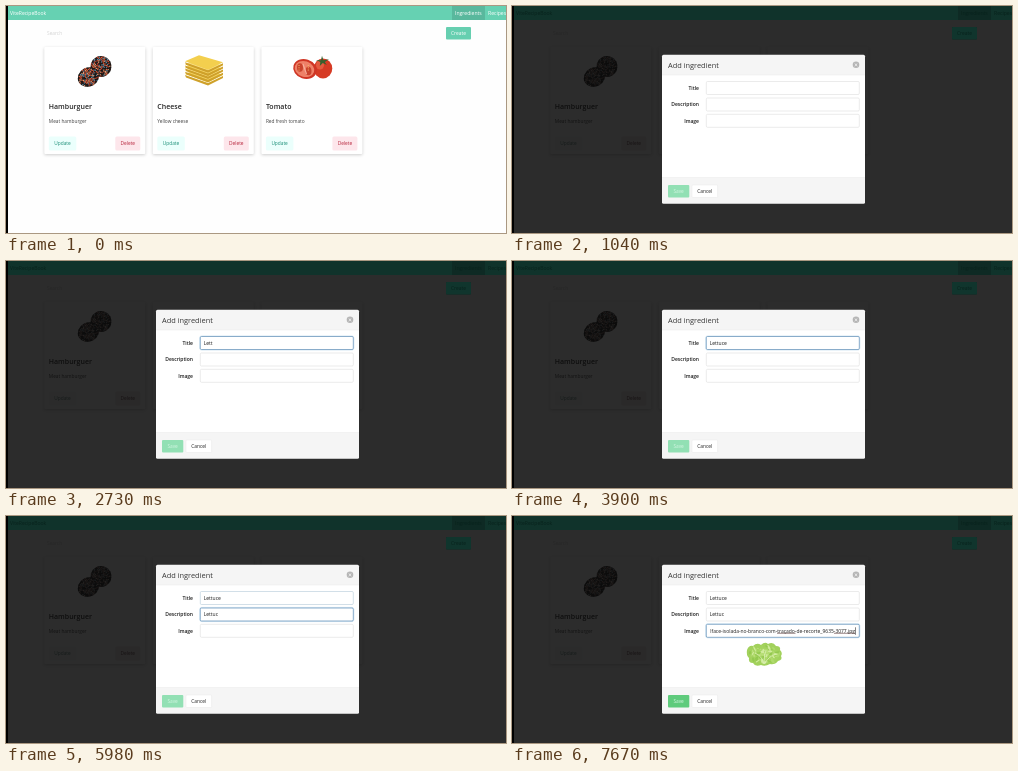
An HTML page that plays this animation: 500 px wide and 227 px high, repeating every 8000 ms.

```html
<!DOCTYPE html>
<html lang="en">
<head>
<meta charset="utf-8">
<title>Recipe book</title>
<style>
html, body { margin: 0; width: 100%; height: 100%; overflow: hidden; background: #fefefe; }
svg { display: block; width: 100%; height: 100%; font: 4.8px "Open Sans", "Noto Sans", sans-serif; }
text { white-space: pre; }
.b { font-weight: 600; }
.card { filter: drop-shadow(0 1px 1.6px rgba(10,10,10,.2)); }
.dim { filter: saturate(.25); }
</style>
</head>
<body>
<svg id="stage" viewBox="0 0 500 227"></svg>
<script>
const LOOP = 8000;
const svg = document.getElementById('stage');

const rect = (x, y, w, h, fill, more = '') =>
  `<rect x="${x}" y="${y}" width="${w}" height="${h}" fill="${fill}" ${more}/>`;
const text = (x, y, s, fill, more = '') =>
  `<text x="${x}" y="${y}" fill="${fill}" ${more}>${s}</text>`;
const oval = (x, y, rx, ry, fill, more = '') =>
  `<ellipse cx="${x}" cy="${y}" rx="${rx}" ry="${ry}" fill="${fill}" ${more}/>`;
const path = (d, fill, more = '') => `<path d="${d}" fill="${fill}" ${more}/>`;
const many = (n, f) => Array.from({ length: n }, (_, i) => f(i)).join('');

function random(seed) {
  return () => (seed = (seed * 16807) % 2147483647) / 2147483647;
}

function patty(cx, cy, rx, ry, seed) {
  const r = random(seed);
  const colors = ['#e2603c', '#151515', '#5f8fae', '#c8452f', '#222', '#e8a07a'];
  return `<g transform="rotate(-28 ${cx} ${cy})">` + oval(cx, cy, rx, ry, '#2a1d18') +
    many(150, i => {
      const a = i * 2.4, d = Math.sqrt(i / 150) * .95;
      return oval((cx + Math.cos(a) * d * rx).toFixed(1), (cy + Math.sin(a) * d * ry).toFixed(1),
        .75, .65, colors[Math.floor(r() * colors.length)]);
    }) + '</g>';
}

function cheese() {
  const slice = i => {
    const y = 71 - i * 3.2;
    return path(`M179 ${y - 2}L202 ${y + 6}L217 ${y - 1}V${y + 1}L202 ${y + 8.5}L180 ${y + .5}Z`, '#cfa12a') +
      path(`M179 ${y - 3}L193 ${y - 9}L217 ${y - 2}L202 ${y + 5.5}Z`, i % 2 ? '#f8e08a' : '#f3cf4e');
  };
  return many(5, slice);
}

function tomato() {
  return oval(317, 62.5, 9.3, 10, '#d63a24') + oval(314, 59, 4, 4.5, '#ea6a4c', 'opacity=".7"') +
    path('M310 54l5 .3 1-4.5 1.4 4.4 5.6-1-4.2 2.8 2 3-4-2-3 3 .5-4Z', '#39602e') +
    oval(299, 63, 12, 9.7, '#cf3524', 'transform="rotate(18 299 63)"') +
    oval(298.5, 63, 10, 7.8, '#ee8168', 'transform="rotate(18 298.5 63)"') +
    oval(294, 61.5, 3, 4.3, '#c9432d') + oval(302.5, 65, 3, 4.3, '#c9432d') +
    many(6, i => oval(293 + (i % 2) * 9.3, 59.5 + (i >> 1) * 2.3, .7, .5, '#f3b866')) +
    path('M297 58l3.5 10', 'none', 'stroke="#f6b09d" stroke-width="1.1"');
}

function lettuce() {
  const r = random(71);
  const greens = ['#a5d45f', '#b9df78', '#94c94f', '#d0eb9c', '#afda6c'];
  return path('M235 134q2-5 6-4q4-4 8-1q4-4 7-1q5-3 8 2q5 0 4 4q3 3 1 6q2 4-3 5q-3 4-8 3q-5 3-9 1q-6 2-8-2q-5 0-4-5q-3-3-2-8Z', '#a2d15c') +
    many(60, i => {
      const a = i * 2.4, d = Math.sqrt(i / 60);
      const x = (252.5 + Math.cos(a) * 15 * d).toFixed(1), y = (138.5 + Math.sin(a) * 8.5 * d).toFixed(1);
      return oval(x, y, (1.2 + r() * 1.8).toFixed(1), (.6 + r() * .8).toFixed(1),
        greens[Math.floor(r() * 5)], `transform="rotate(${Math.round(r() * 180)} ${x} ${y})"`);
    }) +
    path('M252 148q-2-8-9-11M252 148q0-9 2-14M253 147q4-7 11-9', 'none',
      'stroke="#dcefb6" stroke-width=".8"');
}

function card(x, title, note, picture) {
  return rect(x, 41, 101, 107, '#fff', 'rx="1" class="card"') + picture +
    text(x + 4.5, 103, title, '#262626', 'font-size="7" class="b"') +
    text(x + 4.5, 117.2, note, '#444') +
    rect(x + 4.5, 130.5, 27.5, 14, '#ebfffc', 'rx="1.5"') +
    text(x + 18.2, 139, 'Update', '#1c8f78', 'text-anchor="middle"') +
    rect(x + 71, 130.5, 25, 14, '#fde6eb', 'rx="1.5"') +
    text(x + 83.5, 139, 'Delete', '#b8283f', 'text-anchor="middle"');
}

function navbar(bar, tab, ink) {
  return rect(0, 0, 500, 14, bar) + rect(446, 0, 33, 14, tab) +
    text(4, 8.6, 'ViteRecipeBook', ink, 'font-size="5"') +
    text(449, 8.6, 'Ingredients', ink, 'font-size="5.1"') +
    text(482, 8.6, 'Recipes', ink, 'font-size="5.1"');
}

const rows = [['Title', 75.5], ['Description', 92], ['Image', 108.3]];

function field([label, y], i) {
  return text(187, y + 8.3, label, '#1c1c1c', 'text-anchor="end" class="b" font-size="5"') +
    rect(193.6, y - .6, 154.3, 14.2, 'none', `id="glow${i}" rx="2" stroke="#d3e6f3" stroke-width=".8"`) +
    rect(194.3, y, 153, 13, '#fff', `id="box${i}" rx="1.2" stroke-width=".6"`) +
    text(i < 2 ? 197.7 : 343, y + 8.4, '', '#1c1c1c',
      `id="value${i}" font-size="${i < 2 ? 5 : 4.95}" ${i < 2 ? '' : 'text-anchor="end" clip-path="url(#inner)"'}`) +
    rect(198, y + 3, .6, 7.5, '#333', `id="caret${i}"`);
}

svg.innerHTML =
  '<defs><clipPath id="inner"><rect x="197.5" y="108" width="147" height="14"/></clipPath></defs>' +
  rect(0, 0, 500, 227, '#fefefe') + navbar('#66d1b2', '#59b89d', '#fff') +
  text(41, 28.8, 'Search', '#d3d3d3') +
  rect(440, 21, 25, 12.5, '#66cfb0', 'id="create" rx="1"') +
  text(452.5, 29, 'Create', '#fff', 'text-anchor="middle" font-size="4.9"') +
  '<g id="cards">' +
  card(38.3, 'Hamburguer', 'Meat hamburger', patty(95, 60.5, 10.5, 10.5, 11) + patty(82.5, 71, 11, 9.5, 29)) +
  card(146.8, 'Cheese', 'Yellow cheese', cheese()) +
  card(255.4, 'Tomato', 'Red fresh tomato', tomato()) +
  '</g><g id="modal">' +
  rect(0, 0, 500, 227, '#0a0a0a', 'opacity=".86"') + navbar('#10332b', '#0e2a24', '#08221c') +
  rect(440, 21, 25, 12.5, '#10352d', 'rx="1"') +
  text(452.5, 29, 'Create', '#08221c', 'text-anchor="middle" font-size="4.9"') +
  rect(150, 48.7, 203, 149, '#f5f5f5', 'rx="1.5"') + rect(150, 69, 203, 102.5, '#fff') +
  path('M150 69H353M150 171.5H353', 'none', 'stroke="#e6e6e6" stroke-width=".4"') +
  text(156, 62, 'Add ingredient', '#363636', 'font-size="7.4"') +
  oval(344, 58.8, 3.3, 3.3, '#b5b5b5') +
  path('M342.7 57.5l2.6 2.6m0-2.6l-2.6 2.6', 'none', 'stroke="#fff" stroke-width=".7"') +
  rows.map(field).join('') +
  path('M265 117.3H283.5M322 117.3H343', 'none', 'id="spell" stroke="#5a3a3a" stroke-width=".6"') +
  '<g id="photo">' + lettuce() + '</g>' +
  rect(156, 179, 21.3, 12.5, '#92e0b4', 'id="save" rx="1"') +
  text(166.6, 187, 'Save', '#d5f5e3', 'text-anchor="middle"') +
  rect(180, 179, 25.6, 12.5, '#fff', 'rx="1" stroke="#e2e2e2" stroke-width=".4"') +
  text(192.8, 187, 'Cancel', '#222', 'text-anchor="middle" font-size="4.9"') +
  '</g>' + rect(0, 0, 2, 227, '#000');

const el = {};
svg.querySelectorAll('[id]').forEach(e => el[e.id] = e);
const show = (e, on) => e.setAttribute('visibility', on ? 'inherit' : 'hidden');
const within = (t, a, b) => t >= a && t < b;

const WORD = 'Lettuce';
const LINK = 'lface-isolada-no-branco-com-traçado-de-recorte_9635-3077.jpg';
// Times and the number of letters typed by then.
const keys = [
  [[2340, 1], [2600, 2], [2730, 4], [2990, 5], [3380, 6], [3900, 7]],
  [[5070, 1], [5200, 2], [5330, 3], [5590, 4], [5720, 5], [5980, 6]]
];
const focus = [[1300, 4420], [4420, 6240], [6240, LOOP]];
const caretOn = [[1300, 1820], [4420, 4810], [6240, 6630]];

const typed = (t, list) => WORD.slice(0, list.reduce((n, [at, k]) => t >= at ? k : n, 0));

function draw(t) {
  const open = t >= 1040, pasted = t >= 7020;
  el.create.setAttribute('fill', t < 650 ? '#66cfb0' : t < 910 ? '#5dc0a3' : '#55b598');
  el.cards.classList.toggle('dim', open);
  show(el.modal, open);
  rows.forEach((_, i) => {
    const active = within(t, ...focus[i]);
    const fading = i === 0 && within(t, ...focus[1]);
    show(el['glow' + i], active);
    el['box' + i].setAttribute('stroke', active ? '#3f78a8' : fading ? '#b4c9d8' : '#dedede');
    el['value' + i].textContent = i < 2 ? typed(t, keys[i]) : pasted ? LINK : '';
    show(el['caret' + i], within(t, ...caretOn[i]) || (i === 2 && pasted));
  });
  el.caret2.setAttribute('x', pasted ? 343.2 : 198);
  show(el.spell, pasted);
  show(el.photo, t >= 7150);
  el.save.setAttribute('fill', pasted ? '#5fcb7c' : '#92e0b4');
}

const start = performance.now();
function tick() {
  draw((performance.now() - start) % LOOP);
  requestAnimationFrame(tick);
}
tick();
</script>
</body>
</html>
```
